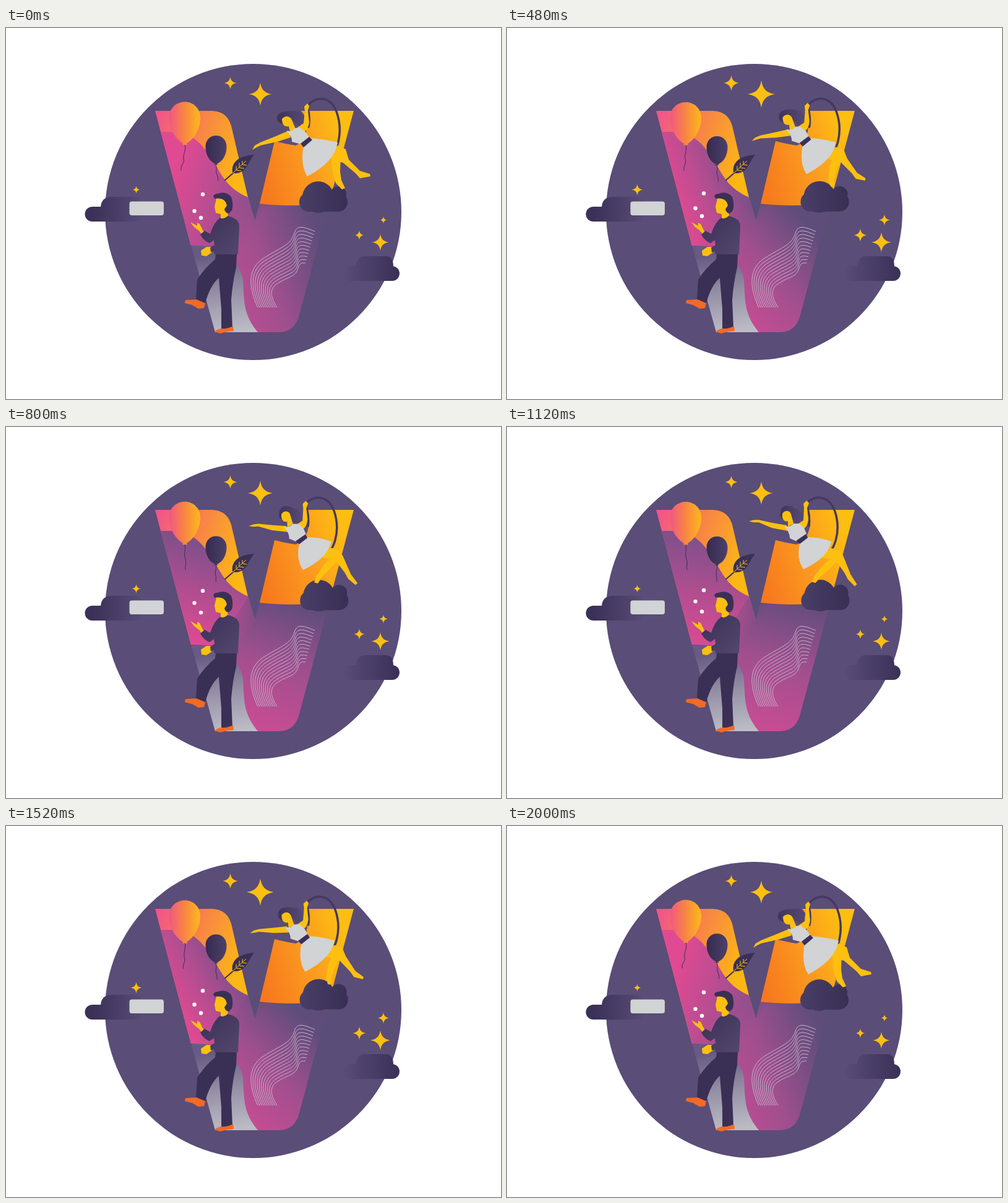
Write an HTML page that moves like this. It is 800 by 600 pixels and loops after 2.04 s.

```html
<!DOCTYPE html>
<html lang="en">
<head>
<meta charset="utf-8">
<title>Letter V</title>
<style>
html, body { margin: 0; width: 100%; height: 100%; overflow: hidden; background: #fff; }
svg { display: block; width: 800px; height: 600px; }
.skin { fill: #fdc010; }
.dark { fill: #3a3056; }
.line { fill: none; stroke: #3a3056; stroke-linecap: round; }
#ring { stroke: #443960; }
</style>
</head>
<body>
<svg viewBox="0 0 800 600" xmlns="http://www.w3.org/2000/svg">
<defs>
  <linearGradient id="warm" gradientUnits="userSpaceOnUse" x1="241" y1="140" x2="390" y2="190">
    <stop stop-color="#f1528f"/><stop offset=".5" stop-color="#f88545"/><stop offset="1" stop-color="#fdb714"/>
  </linearGradient>
  <linearGradient id="orange" gradientUnits="userSpaceOnUse" x1="412" y1="245" x2="556" y2="200">
    <stop stop-color="#f7791e"/><stop offset=".55" stop-color="#fb9b1f"/><stop offset="1" stop-color="#fdbe12"/>
  </linearGradient>
  <linearGradient id="pink" gradientUnits="userSpaceOnUse">
    <stop stop-color="#e14a92"/><stop offset=".45" stop-color="#b94d91"/><stop offset="1" stop-color="#80508a"/>
  </linearGradient>
  <linearGradient id="violet" gradientUnits="userSpaceOnUse">
    <stop stop-color="#c84c93"/><stop offset=".5" stop-color="#a04f8e"/><stop offset="1" stop-color="#5e4d7b"/>
  </linearGradient>
  <linearGradient id="silver" gradientUnits="userSpaceOnUse" x1="345" y1="365" x2="362" y2="492">
    <stop stop-color="#675a83"/><stop offset=".5" stop-color="#9691a6"/><stop offset="1" stop-color="#bcbcc6"/>
  </linearGradient>
  <linearGradient id="balloon"><stop stop-color="#f15782"/><stop offset=".5" stop-color="#f88642"/><stop offset="1" stop-color="#fdb91a"/></linearGradient>
  <linearGradient id="night"><stop stop-color="#352b50"/><stop offset="1" stop-color="#4b4069"/></linearGradient>
  <linearGradient id="curls"><stop stop-color="#3f3459"/><stop offset="1" stop-color="#574a75"/></linearGradient>
  <linearGradient id="coat" x1="0" y1="0" x2="1" y2="1"><stop stop-color="#3a3056"/><stop offset="1" stop-color="#54476f"/></linearGradient>
  <linearGradient id="cloudLeft" gradientUnits="userSpaceOnUse" x1="140" y1="0" x2="222" y2="0">
    <stop stop-color="#3b3158"/><stop offset="1" stop-color="#594c77"/>
  </linearGradient>
  <linearGradient id="cloudRight" gradientUnits="userSpaceOnUse" x1="632" y1="0" x2="546" y2="0">
    <stop stop-color="#3b3158"/><stop offset="1" stop-color="#594c77"/>
  </linearGradient>
  <linearGradient id="cloudSeat" gradientUnits="userSpaceOnUse" x1="474" y1="0" x2="552" y2="0">
    <stop stop-color="#493e66"/><stop offset="1" stop-color="#392f55"/>
  </linearGradient>
  <linearGradient id="fade" gradientUnits="userSpaceOnUse" x1="352" y1="300" x2="395" y2="330">
    <stop stop-color="#000"/><stop offset="1" stop-color="#fff"/>
  </linearGradient>
  <mask id="blend" maskUnits="userSpaceOnUse" x="290" y="260" width="260" height="240">
    <rect x="290" y="260" width="260" height="240" fill="url(#fade)"/>
  </mask>
</defs>

<circle cx="399.500" cy="297.500" r="239.500" fill="#5a4d78"/>
<g id="stars" fill="#fdc010"></g>

<!-- letter -->
<path fill="url(#warm)" d="M241 134H330C349 134 359 142 364 158L391 274L402 312L299 352Z"/>
<path fill="url(#pink)" d="M250 168H268C300 169 315 186 330 207C347 232 352 257 391.500 274L402 312L440 400L383 410L340 354L299 352Z"/>
<path fill="url(#violet)" mask="url(#blend)" d="M391.500 274L402 312L410 282C440 284 490 283 523 282L474 464Q467 492 441 492H400L340 354Z"/>
<path fill="url(#silver)" d="M299.500 353Q322 351 344 358Q380 380 383 408C385 445 384 464 407 492H338Z"/>
<path id="sail" fill="url(#orange)"/>
<g id="waves" fill="none" stroke="#c5b8cd" stroke-width="1"></g>

<!-- clouds -->
<g fill="url(#cloudLeft)"><rect x="127.500" y="289" width="94" height="24" rx="12"/><path d="M153 290Q154 273 171 273H208Q222 273 222 290V302H153Z"/></g>
<rect x="199.500" y="280.500" width="55.500" height="22.500" rx="4" fill="#d1d3d4"/>
<g fill="url(#cloudRight)"><rect x="545" y="385" width="91" height="24" rx="12"/><path d="M565 392Q565 369 580 369H614Q626 369 626 386V396H565Z"/></g>

<!-- balloons -->
<path id="cordA" class="line" stroke-width="1"/>
<g id="balloonA" fill="url(#balloon)"><path d="M289 119.500C303 119.500 314 130 314 145C314 163 304 180 292 186.500L293 189H285L286 186.500C274 180 263.500 163 263.500 145C263.500 130 275 119.500 289 119.500Z"/></g>
<path id="cordB" class="line" stroke-width="1"/>
<g id="balloonB" fill="url(#night)"><path d="M339.500 174C349 174 356.500 181 356.500 192C356.500 205 350 216 341 219.500L343 221H336L338 219.500C329 216 322.500 205 322.500 192C322.500 181 330 174 339.500 174Z"/></g>

<!-- feather -->
<path class="dark" d="M366 234C364 220 372 207 401 205C394 213 390 226 383 231C377 235 371 236 366 234Z"/>
<path class="line" stroke-width="2" d="M354 246L369 233"/>
<path fill="none" stroke="#fdc010" stroke-width="1" d="M366 235L388 215M372 229V223M377 225V218M382 221V215M372 230L380 231M377 226L385 227M382 221L389 222"/>

<!-- juggler -->
<g id="balls" fill="#fff"></g>
<path class="skin" d="M320 331L313 317L309 315L309 320L298 314L304 322L312 328L316 333ZM334 354L324 354L315 360L316 368L324 369L333 363Z"/>
<path class="skin" d="M340 276L337 289L339 299L347 301L347 309L359 306L357 285L351 275Z"/>
<path class="dark" d="M335 272Q337 268 342 268Q355 263 364 273Q368 285 365 295L360 300Q354 299 353 293L357 287Q355 279 350 277Q342 274 337 276Z"/>
<path fill="url(#coat)" d="M346 307Q352 310 358 304Q378 308 377 322L375 366H337L336 361L331 363L330 355L337 351L336 343L329 348Q319 344 314 334L321 328L330 333Q336 314 346 307Z"/>
<path class="dark" d="M339 366H373L372 387Q366 412 364 440L366 485L348 488L348 455L344 404Q330 416 322 445L307 440L309 407Q321 388 338 374Z"/>
<path fill="#f26a26" d="M308 439L322 445L320 453L311 454L301 448L289 445L290 440ZM348 486Q358 487 367 482L368 490L358 491L346 494L337 491Q341 487 348 486Z"/>

<!-- acrobat -->
<g id="seat" fill="url(#cloudSeat)"><circle cx="504.500" cy="273.500" r="25.500"/><circle cx="537" cy="269" r="13"/><rect x="474" y="266" width="78" height="31" rx="15"/></g>
<path id="hair" fill="url(#curls)"/>
<path id="ring" class="line" stroke-width="3.500"/>
<path id="legBack" class="skin"/>
<path id="legFront" class="skin"/>
<path id="armUp" class="skin"/>
<path id="armOut" class="skin"/>
<path id="face" class="skin"/>
<path id="bodice" fill="#d1d3d4"/>
<path id="skirt" fill="#d1d3d4"/>
<path id="belt" class="dark"/>
</svg>
<script>
const LOOP = 2040, STEP = 40;
const el = id => document.getElementById(id);
const mix = (a, b, k) => a + (b - a) * k;
const numbers = /-?\d+(\.\d+)?/g;

// Blends two paths that share the same commands.
function morph(a, b, k) {
  const end = b.match(numbers);
  let i = 0;
  return a.replace(numbers, n => mix(+n, +end[i++], k).toFixed(2));
}

function add(parent, tag, attrs) {
  const node = document.createElementNS('http://www.w3.org/2000/svg', tag);
  for (const key in attrs) node.setAttribute(key, attrs[key]);
  return el(parent).appendChild(node);
}

const poses = {
  sail: ['M477 134H562L522 284C480 288 440 288 410 284L434 183Q454 188 468 190C486 184 491 160 477 134Z',
         'M488 134H562L522 284C480 288 440 288 410 284L434 183Q454 188 468 190C486 184 495 160 488 134Z'],
  hair: ['M438 147C437 134 455 134 472 134C483 135 486 148 482 156C474 162 466 152 462 147C454 141 446 144 447 155C440 153 438 150 438 147Z',
         'M442 139C443 125 456 124 464 131C478 134 482 150 474 158C468 160 464 152 459 144C453 134 446 136 447 150C442 147 441 143 442 139Z'],
  ring: ['M489 160Q492 145 487 127C497 111 523 107 534 135C545 165 538 206 517 209',
         'M488 160Q490 145 484 124C495 110 520 108 530 137C540 168 530 206 508 209'],
  legBack: ['M526 203L541 205L540 232L542 246L548 259L543 261L533 251L527 228Z',
            'M538 201L543 209L518 232L506 242L497 252L491 250L497 239L512 222Z'],
  legFront: ['M518 208L536 190L549 196L554 213L572 231L588 236L589 240L572 243L565 235L545 218L530 214Z',
             'M507 211L523 196L537 200L543 208L555 239L565 255L561 258L550 246L545 236L530 215L519 213Z'],
  armUp: ['M483 134L482 127L487 122L490 126L488 134L490 152Q488 168 479 168L468 163L481 154Z',
          'M480 131L479 124L484 119L488 123L485 131L487 149Q485 165 476 165L465 160L479 151Z'],
  face: ['M446 147C452 140 460 143 462 149L468 163L459 168L457 159C449 161 446 154 446 147Z',
         'M445 140C449 133 458 135 459 141L463 156L454 161L454 152C447 154 444 147 445 140Z'],
  bodice: ['M453 166Q461 169 467 162L475 161L485 169L490 177L477 188L462 184Q463 176 453 166Z',
           'M448 160Q456 163 463 156L472 156L480 163L484 173L468 185L457 180Q457 170 448 160Z'],
  skirt: ['M491 178Q515 180 536 185Q531 217 487 240Q475 222 481 190Z',
          'M484 178Q506 178 524 185Q520 210 479 230Q467 213 473 188Z'],
  belt: ['M476 187L490 176L495 181L481 193Z', 'M467 184L483 173L486 179L473 189Z'],
  cordA: ['M289 188C292 198 286 202 287 212C289 220 282 220 283 230',
          'M289 189C291 199 287 203 290 213C293 221 290 223 291 231'],
  cordB: ['M339 221C342 228 338 231 341 237C343 241 342 243 343 247',
          'M339 223C341 230 337 233 338 239C340 243 338 245 339 250']
};
const armOut = ['M457 166L436 175L411 185L402 190L398 197L405 193L411 190L438 184L460 177Z',
                'M452 159L430 155L407 150L399 150L391 152L399 154L407 154L428 163L454 168Z'];

// x, y, smallest and largest radius
const stars = [[362.5, 89, 10, 12.5], [411, 107, 18.5, 22], [210.5, 261.5, 6, 9],
  [605, 346.5, 13.5, 16], [571, 335, 7.5, 10.5], [610, 310.5, 5.5, 9]].map(([x, y, min, max]) => ({
  x, y, min, max,
  node: add('stars', 'path', { d: 'M0-1C.1-.38 .38-.1 1 0C.38 .1 .1 .38 0 1C-.1 .38-.38 .1-1 0C-.38-.1-.1-.38 0-1Z' })
}));
const balls = [[318, 269, 264], [304.5, 296, 282], [315, 307, 298.5]].map(([cx, low, high]) => ({
  low, high, node: add('balls', 'circle', { cx, r: 3.2 })
}));

for (let i = 0; i <= 10; i++) {
  add('waves', 'path', { d: morph(
    'M407 452C392 420 390 390 415 373C447 353 460 351 466 332C470 318 480 321 499 329',
    'M438 452C427 434 426 424 436 415C456 401 468 404 472 388C475 379 479 380 484 380', i / 10) });
}

const swing = (turn, power) => Math.pow(0.5 - 0.5 * Math.cos(turn * 2 * Math.PI), power);
const shift = (id, x, y) => el(id).setAttribute('transform', `translate(${x} ${y})`);

function gradient(id, from, to, k) {
  ['x1', 'y1', 'x2', 'y2'].forEach((key, i) => el(id).setAttribute(key, mix(from[i], to[i], k)));
}

function draw(time) {
  const turn = Math.floor(time % LOOP / STEP) * STEP / LOOP;
  const body = swing(turn, 1.25);
  const reach = swing(turn - 0.022, 1.2);
  const glow = swing(turn * 2, 1);

  for (const id in poses) el(id).setAttribute('d', morph(...poses[id], body));
  el('armOut').setAttribute('d', morph(...armOut, reach));
  for (const s of stars) {
    s.node.setAttribute('transform', `translate(${s.x} ${s.y}) scale(${mix(s.min, s.max, glow)})`);
  }
  for (const b of balls) b.node.setAttribute('cy', mix(b.low, b.high, reach));
  shift('balloonA', 0, body * 1.5);
  shift('balloonB', 0, body * 3);
  shift('seat', body * 1.5, -body);
  gradient('pink', [265, 250, 415, 298], [288, 368, 320, 180], body);
  gradient('violet', [330, 440, 520, 372], [415, 490, 470, 270], body);
}

function tick() {
  draw(performance.now());
  requestAnimationFrame(tick);
}
tick();
</script>
</body>
</html>
```
